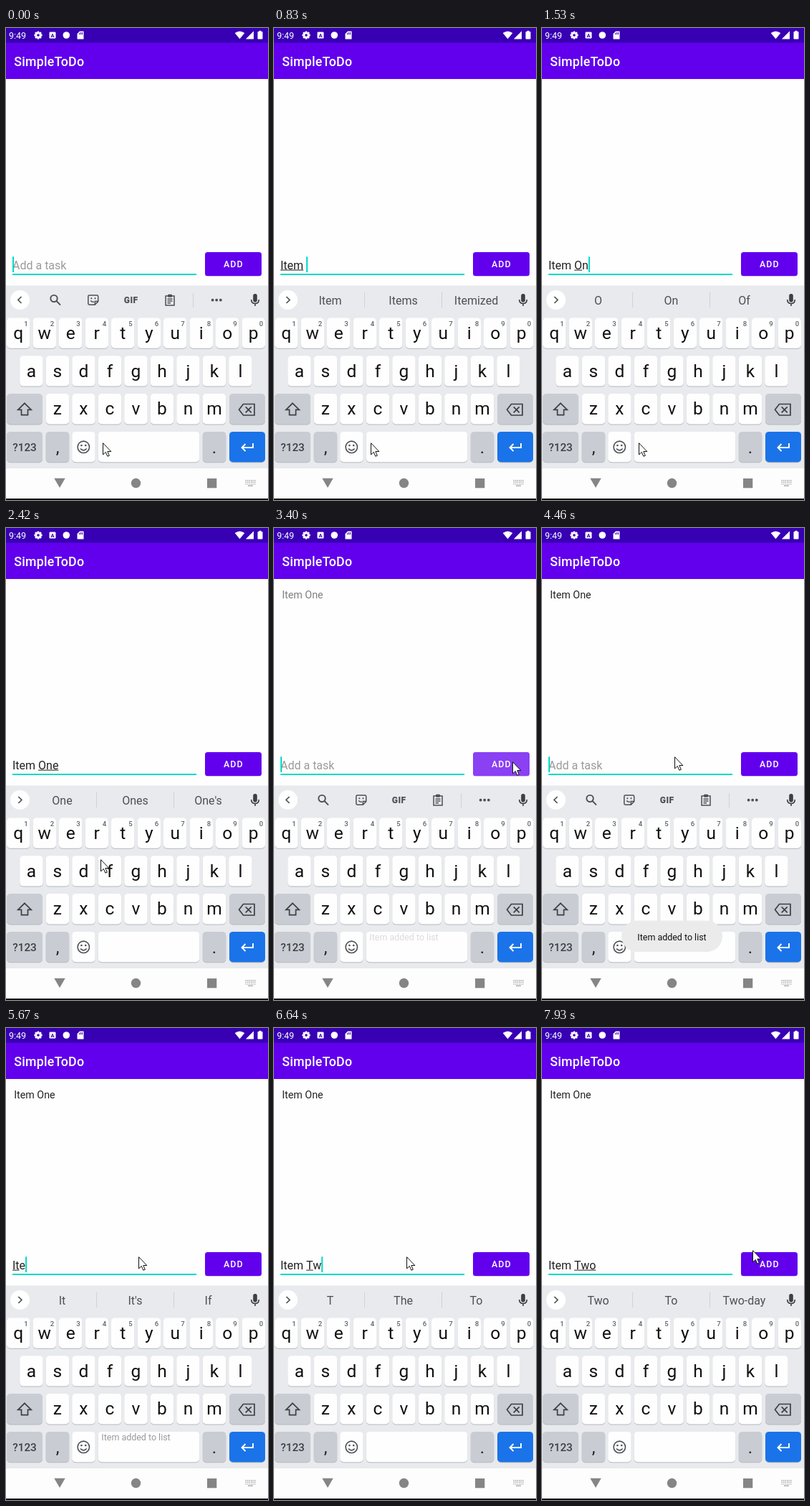
Animation, 366 px wide and 657 px high, one loop 8 s. Source, as an HTML page with a canvas:

```html
<!DOCTYPE html>
<html lang="en">
<head>
<meta charset="utf-8">
<title>To-do list</title>
<style>
html, body { margin: 0; width: 100%; height: 100%; overflow: hidden; background: #fefefe }
canvas { display: block; width: 366px; height: 657px }
</style>
</head>
<body>
<canvas></canvas>
<script>
const W = 366, H = 657, LOOP = 8000;
const canvas = document.querySelector('canvas'), ctx = canvas.getContext('2d');
const ratio = window.devicePixelRatio || 1;
canvas.width = W * ratio;
canvas.height = H * ratio;
const PURPLE = '#6200ee', TEAL = '#03dac5', INK = '#222', ICON = '#4c4f54', BOARD = '#e8eaed', GREY_KEY = '#c9cdd3';

// Each track holds [start ms, ...values]; the latest started entry applies.
const typed = [[0, ''], [150, 'I'], [320, 'It'], [490, 'Ite'], [660, 'Item'], [830, 'Item '],
  [1110, 'Item O'], [1400, 'Item On'], [1690, 'Item One'], [3400, ''], [5200, 'I'], [5500, 'It'],
  [5670, 'Ite'], [5790, 'Item'], [6070, 'Item '], [6490, 'Item T'], [6640, 'Item Tw'], [6790, 'Item Two']];
// [start, text already underlined, suggestions]
const suggested = [[0, '', ''], [320, 'I', "I|I'm|It"], [490, 'It', "It|It's|If"],
  [660, 'Item', 'Item|Items|Itemized'], [1250, 'Item O', 'O|On|Of'], [1540, 'Item On', 'On|One|Only'],
  [1830, 'Item One', "One|Ones|One's"], [3400, '', ''], [5500, 'I', "I|I'm|It"], [5670, 'It', "It|It's|If"],
  [5930, 'Item', 'Item|Items|Itemized'], [6490, 'Item T', 'T|The|To'], [6790, 'Item Tw', 'Tw|Two|Twin'],
  [7100, 'Item Two', 'Two|To|Two-day']];
const caret = [[0, 1], [2420, 0], [2900, 1], [3930, 0], [4340, 1], [4890, 0], [5200, 1], [7500, 0]];
const pointer = [[0, 135, 577], [2420, 132, 461], [2560, 170, 350], [2700, 262, 302], [2840, 318, 312],
  [2970, 333, 325], [3800, 270, 322], [3930, 215, 318], [4060, 187, 317], [4460, 185, 318],
  [7810, 262, 293], [7930, 294, 309]];
const press = [[0, 0], [3250, .25], [3520, .18], [3660, .08], [3800, 0]];
const listItem = [[0, 0], [3400, .58], [3520, .85], [3660, 1]];
const toast = [[0, 0], [3400, .15], [3520, .5], [3660, 1], [5500, .8], [5670, .42], [5790, 0]];
const at = (track, t) => track.findLast(entry => entry[0] <= t).slice(1);

function rect(x, y, w, h, color, r = 0) {
  ctx.fillStyle = color;
  ctx.beginPath();
  ctx.roundRect(x, y, w, h, r);
  ctx.fill();
}
function disc(x, y, r, color) {
  rect(x - r, y - r, 2 * r, 2 * r, color, r);
}
function text(str, x, y, size, color, { weight = 400, align = 'left', spacing = 0 } = {}) {
  ctx.font = `${weight} ${size}px Roboto, sans-serif`;
  ctx.letterSpacing = spacing + 'px';
  ctx.textAlign = align;
  ctx.fillStyle = color;
  ctx.fillText(str, x, y);
}
function fill(d, color, rule = 'nonzero') {
  ctx.fillStyle = color;
  ctx.fill(new Path2D(d), rule);
}
function line(d, color = ICON, width = 1.7) {
  ctx.strokeStyle = color;
  ctx.lineWidth = width;
  ctx.stroke(new Path2D(d));
}
const circle = (x, y, r) => `M${x - r} ${y}a${r} ${r} 0 1 0 ${2 * r} 0a${r} ${r} 0 1 0 ${-2 * r} 0z`;

function key(x, row, w = 32.5, color = '#fefefe') {
  const y = 403.5 + 52.8 * row;
  rect(x, y + 1, w, 42.3, '#b6b9be', 5);
  rect(x, y, w, 42.3, color, 5);
}

function statusBar() {
  rect(0, 0, W, 21, '#3700b3');
  rect(0, 20.5, W, 50.5, PURPLE);
  text('9:49', 4, 14.7, 12.5, '#fff');
  for (let i = 0; i < 4; i++) {
    ctx.save();
    ctx.translate(45, 10);
    ctx.rotate(i * Math.PI / 4);
    rect(-1.4, -5.6, 2.8, 11.2, '#fff', .6);
    ctx.restore();
  }
  line(circle(45, 10, 3), '#fff', 2.2);
  disc(45, 10, 1.8, '#3700b3');
  rect(60.5, 5.5, 9, 9, '#fff', 1.2);
  text('A', 65, 12.8, 7.5, '#3700b3', { weight: 700, align: 'center' });
  disc(84.3, 10, 4.8, '#fff');
  fill('M103 4.5h5.5v11h-9v-7.5zM102 7v2.3h1V7zM104 6v3.3h1V6zM106 6v3.3h1V6z', '#fff', 'evenodd');
  fill('M319.7 7Q326.5 2 333.3 7L326.5 15.3z', '#fff');
  fill('M346 4.5v10.8h-10.8zM344.6 8v5.9h-5.9z', '#fff', 'evenodd');
  fill('M346 4.5v10.8h-10.8z', '#fff');
  rect(351.5, 5, 7, 10.5, '#fff', .8);
  rect(353.5, 3.8, 3, 2, '#fff');
  text('SimpleToDo', 11.3, 52.7, 17.8, '#fff', { weight: 500, spacing: .22 });
}

function toolbar(words) {
  disc(19.5, 378.5, 13.5, '#fff');
  if (words) {
    line('M17.3 374l4.6 4.5l-4.6 4.5');
    words.split('|').forEach((word, i) => text(word, 78.5 + 102 * i, 385, 16, ICON, { align: 'center' }));
    rect(126, 368, 1, 21, '#cfd2d6');
    rect(234, 368, 1, 21, '#cfd2d6');
  } else {
    line('M21.5 374l-4.6 4.5l4.6 4.5');
    line(circle(67, 376.6, 4.7) + 'M70.5 380l5.5 5.6', ICON, 1.9);
    line('M116.5 372h10.5q1.7 0 1.7 1.7v7l-4.5 4.6h-7.7q-1.7 0-1.7-1.7v-9.9q0-1.7 1.7-1.7zM128.5 380.5h-4.2v4.6M118.2 379.5q2 2.5 4.7 1.6', ICON, 1.5);
    disc(119.3, 376.3, 1.1, ICON);
    disc(124.5, 376.3, 1.1, ICON);
    text('GIF', 174.7, 382.6, 12, ICON, { weight: 900, align: 'center', spacing: .5 });
    line('M223 373h12v13h-12zM225.5 377.3h7M225.5 380h7M225.5 382.7h4.5', ICON, 1.5);
    rect(226, 370.7, 6, 4, ICON, 1);
    rect(261, 369, 1, 20, '#cfd2d6');
    for (const x of [288.6, 294.2, 299.8]) disc(x, 378.7, 1.9, ICON);
  }
  rect(345.2, 370, 5.6, 11.5, '#3c4043', 2.8);
  line('M342.7 378q0 5.5 5.3 5.5t5.3-5.5M348 383.5v3.6', '#3c4043', 1.6);
}

function keyboard() {
  ['qwertyuiop', 'asdfghjkl', 'zxcvbnm'].forEach((letters, row) => {
    const left = [1, 19.2, 55.7][row];
    [...letters].forEach((letter, i) => {
      const x = left + 36.5 * i;
      key(x, row);
      text(letter, x + 16.2, 432.7 + 52.8 * row, 24.5, '#111', { align: 'center' });
      if (row === 0) text((i + 1) % 10, x + 27, 414.6, 9.5, '#5f6368', { weight: 500, align: 'center' });
    });
  });
  key(1, 2, 50, GREY_KEY);
  key(312, 2, 50, GREY_KEY);
  key(1, 3, 50, GREY_KEY);
  key(55.7, 3, 32.5, GREY_KEY);
  key(92.2, 3);
  key(128.7, 3, 141.5);
  key(274.8, 3, 32.5, GREY_KEY);
  key(312, 3, 50, '#1a73e8');
  line('M26 522.3l9.2 9h-4.7v7.4h-9v-7.4h-4.7z', '#3c4043');
  line('M331.5 523.5h15.5v15.5h-15.5l-6-7.75zM334.7 527.3l8 8M342.7 527.3l-8 8', '#3c4043');
  line('M345 578v6h-15M334.5 579l-5 5l5 5', '#fff', 1.9);
  text('?123', 26, 589.2, 15.3, '#3c4043', { weight: 500, align: 'center' });
  text(',', 72, 592, 24, '#222', { align: 'center' });
  text('.', 291, 592, 24, '#222', { align: 'center' });
  line(circle(108.3, 583.3, 8.2) + 'M104 585.5q4.3 4.8 8.6 0', ICON, 1.6);
  disc(105.4, 581, 1.3, ICON);
  disc(111.2, 581, 1.3, ICON);
}

function navBar() {
  rect(0, 613, W, 42, '#fdfdfd');
  rect(0, 655, W, 2, '#000');
  fill('M67.3 626.8h15.4l-7.7 13.2z', '#858585');
  disc(181.5, 633.5, 6.7, '#858585');
  rect(281, 627, 13.3, 13.3, '#858585');
  for (let i = 0; i < 6; i++)
    for (let j = 0; j < 3; j++) rect(334.5 + 2.5 * i, 629 + 2.6 * j, 1.4, 1.4, '#a5a5a5');
  rect(338, 636.6, 7, 1.3, '#a5a5a5');
}

function entryField(t) {
  const [value] = at(typed, t), [marked] = at(suggested, t);
  text(value || 'Add a task', 9, 335.7, 16, value ? INK : '#9b9b9b');
  const width = str => ctx.measureText(str).width;
  if (marked) {
    const start = width(marked.slice(0, marked.lastIndexOf(' ') + 1));
    rect(9 + start, 336.6, width(marked) - start, 1, INK);
  }
  rect(9, 342, 257, 2, TEAL);
  if (at(caret, t)[0]) rect(9 + width(value), 318.3, 2, 21.7, TEAL);
}

function button(t) {
  rect(278, 312, 79, 33.3, PURPLE, 3.6);
  rect(278, 312, 79, 33.3, `rgba(255,255,255,${at(press, t)[0]})`, 3.6);
  text('ADD', 303.9, 333.2, 12.46, '#fff', { weight: 500, spacing: 1.1 });
}

function message(alpha) {
  ctx.globalAlpha = Math.max(0, 2 * alpha - 1);
  rect(111, 546.5, 141, 43.5, '#ebebeb', 21.7);
  ctx.globalAlpha = alpha;
  text('Item added to list', 181.5, 573.5, 12.46, '#111', { align: 'center' });
  ctx.globalAlpha = 1;
}

function arrow(x, y) {
  ctx.save();
  ctx.translate(x + .5, y + .7);
  const shape = 'M0 0v16.2l3.8-3.5l2.5 5.8l2.5-1l-2.5-5.7h5z';
  fill(shape, '#fff');
  line(shape, '#111', 1);
  ctx.restore();
}

function draw(now) {
  const t = now % LOOP;
  ctx.setTransform(ratio, 0, 0, ratio, 0, 0);
  rect(0, 0, W, H, '#fefefe');
  statusBar();
  ctx.globalAlpha = at(listItem, t)[0];
  text('Item One', 11.2, 98, 14.25, INK);
  ctx.globalAlpha = 1;
  entryField(t);
  button(t);
  rect(0, 358.5, W, 254.5, BOARD);
  toolbar(at(suggested, t)[1]);
  keyboard();
  navBar();
  message(at(toast, t)[0]);
  arrow(...at(pointer, t));
}

const begin = performance.now();
function tick() {
  draw(performance.now() - begin);
  requestAnimationFrame(tick);
}
tick();
</script>
</body>
</html>
```
